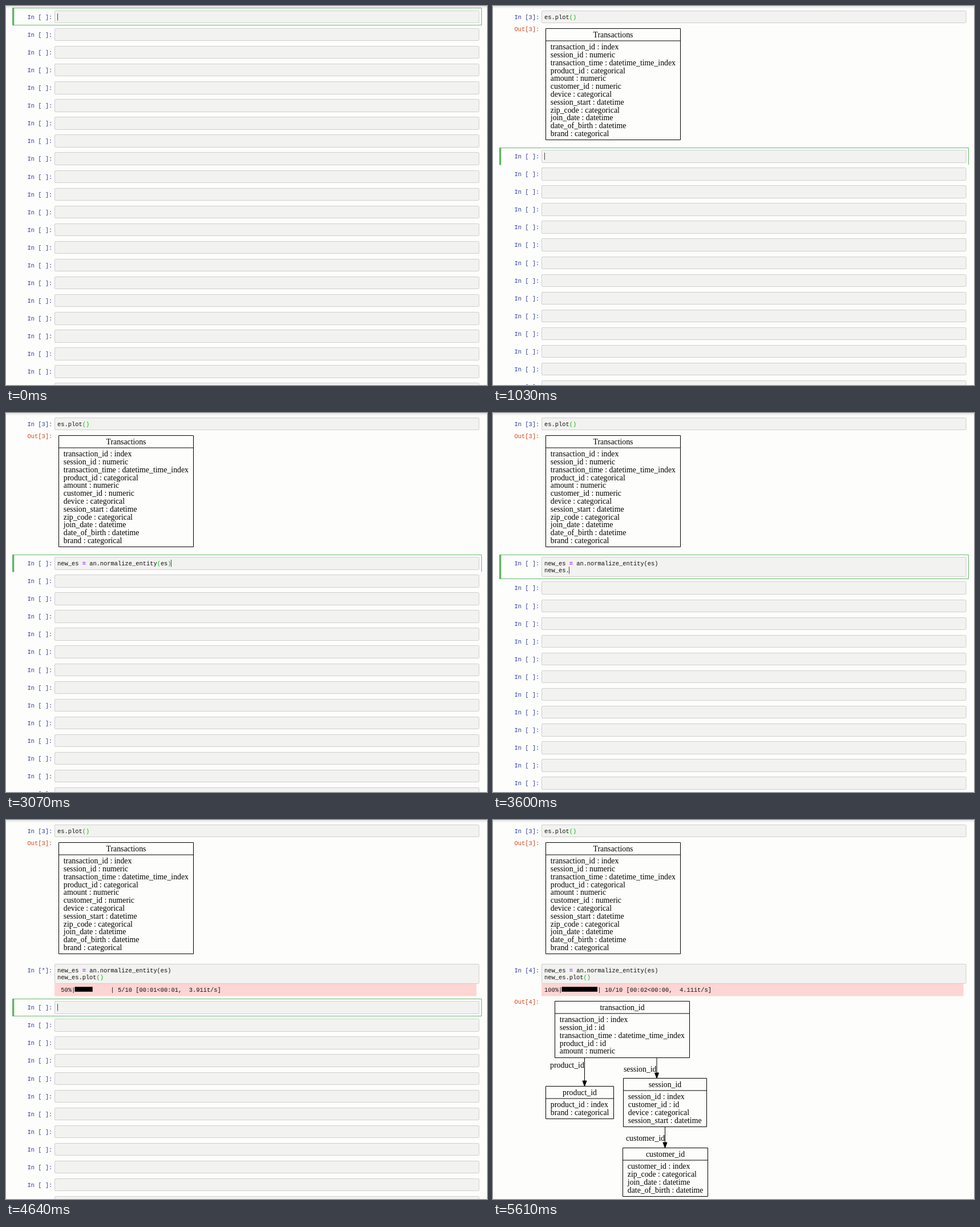
Animation of 843 by 664 pixels, one loop 5650 ms. Source, as an HTML page:

```html
<!DOCTYPE html>
<html lang="en">
<head>
<meta charset="utf-8">
<title>Notebook session</title>
<style>
  html, body { margin: 0; width: 100%; height: 100%; overflow: hidden; background: #fdfdfc; }
  svg { display: block; }
  text { white-space: pre; font: 10.4px "Liberation Mono", Courier, monospace; fill: #111; }
  .in { fill: #303f9f; }
  .out { fill: #d84315; }
  .op { fill: #a2f; font-weight: bold; }
  .match { fill: #0b0; }
  .box { fill: #f2f2f0; stroke: #cfcfcf; }
  .sel { fill: none; stroke: #66bb6a; }
  .bar { fill: #5bb562; }
  .log { fill: #fdd5d4; }
  .caret { fill: #444; }
  .graph text { font: 13.8px "Liberation Serif", Times, serif; fill: #000; }
  .graph path { fill: none; stroke: #000; }
  .graph .tip { fill: #000; }
  .graph .title { text-anchor: middle; }
</style>
</head>
<body>
<svg width="843" height="664" viewBox="0 0 843 664">
  <defs>
    <linearGradient id="shade" x2="0" y2="1">
      <stop stop-color="#e4e4e4"/><stop offset="1" stop-color="#fdfdfc"/>
    </linearGradient>
  </defs>
  <rect width="843" height="5" fill="url(#shade)"/>
  <g id="page"></g>
</svg>
<script>
const LOOP = 5650, CHAR = 6.24, PITCH = 31.08, LINE = 12.3;
const KEY = 57, BLINK = 180, ITERATION = 81;
const RUN1 = 1020, ENTER = 3110, RUN2 = 4160, DONE = 5090;
const first = { text: "es.plot()", start: 140 };
const second = { text: "new_es = an.normalize_entity(es)", start: 1270 };
const third = { text: "new_es.plot()", start: 3220 };
const page = document.getElementById("page");

const text = (x, y, s, cls = "") => `<text x="${x}" y="${y}" class="${cls}">${s}</text>`;
const rect = (x, y, w, h, cls = "", r = 0) =>
  `<rect x="${x}" y="${y}" width="${w}" height="${h}" rx="${r}" class="${cls}"/>`;

const typed = (k, t) => k.text.slice(0, Math.max(0, Math.floor((t - k.start) / KEY) + 1));
const lastKey = (k, t, focus) =>
  t < k.start ? focus : k.start + KEY * (typed(k, t).length - 1);
const closed = s => s.includes("(") && !s.includes(")") ? s + ")" : s;

function code(y, s, match) {
  s = s.replace("=", '<tspan class="op">@</tspan>').replace("@", "=");
  if (match) s = s.replace(/[()]/g, '<tspan class="match">$&</tspan>');
  return text(90, y, s);
}

function cell(top, count = " ", lines = [], matchLine = -1) {
  const y = Math.round(top), extra = lines.length > 1 ? LINE : 0;
  return rect(85.5, y + .5, 743.5, Math.round(top + 21.4 + extra) - y, "box", 1.5) +
    text(37.5, y + 14.5, `In [${count}]:`, "in") +
    lines.map((s, i) => code(y + 14.5 + i * LINE, s, i === matchLine)).join("");
}

function selection(top, height, open) {
  const y = Math.round(top - 4.4) + .5;
  return `<path class="sel" d="M11.5 ${y + height}V${y}H833.5V${y + height}${open ? "" : "Z"}"/>` +
    rect(11, y - .5, 3.3, height + 1, "bar");
}

function caret(top, col, row, age) {
  return age % (2 * BLINK) < BLINK
    ? rect(Math.floor(90 + col * CHAR), Math.round(top) + 5 + row * LINE, 1, 12.5, "caret") : "";
}

function blanks(top) {
  let s = "";
  for (; top < 664; top += PITCH) s += cell(top);
  return s;
}

function table(x, y, w, title, rows) {
  const h = Math.round(29.5 + 13.8 * rows.length);
  return `<path d="M${x} ${y}h${w}v${h}h${-w}zM${x} ${y + 21.5}h${w}"/>` +
    text(x + w / 2, y + 15, title, "title") +
    rows.map((r, i) => text(x + 8.3, y + 36.6 + 13.82 * i, r.replace(":", " : "))).join("");
}

function edge(x, y, end, label, lx, ly) {
  return `<path d="M${x} ${y}V${end - 9}"/><path class="tip" d="M${x - 3.5} ${end - 9.5}h7l-3.5 9.5z"/>` +
    text(lx, ly, label);
}

const graph = s => `<g class="graph">${s}</g>`;

const before = graph(table(92.5, 39.5, 236, "Transactions", [
  "transaction_id:index", "session_id:numeric", "transaction_time:datetime_time_index",
  "product_id:categorical", "amount:numeric", "customer_id:numeric", "device:categorical",
  "session_start:datetime", "zip_code:categorical", "join_date:datetime",
  "date_of_birth:datetime", "brand:categorical"]));

const after = graph(
  table(108.5, 317.5, 236, "transaction_id", ["transaction_id:index", "session_id:id",
    "transaction_time:datetime_time_index", "product_id:id", "amount:numeric"]) +
  table(92.5, 466.5, 119, "product_id", ["product_id:index", "brand:categorical"]) +
  table(228.5, 452.5, 146, "session_id", ["session_id:index", "customer_id:id",
    "device:categorical", "session_start:datetime"]) +
  table(227.5, 574.5, 149, "customer_id", ["customer_id:index", "zip_code:categorical",
    "join_date:datetime", "date_of_birth:datetime"]) +
  edge(160.5, 416.5, 466.5, "product_id", 100, 434) +
  edge(287, 416.5, 452.5, "session_id", 229, 440.8) +
  edge(301.5, 537.5, 574.5, "customer_id", 233, 562.3));

function progress(t) {
  const n = Math.min(10, Math.floor((t - RUN2) / ITERATION));
  const rate = 3.71 + .04 * n;
  const clock = steps => "00:0" + Math.floor(steps / rate);
  const stats = n ? `${clock(n)}&lt;${clock(10 - n)},  ${rate.toFixed(2)}it/s` : "00:00&lt;?, ?it/s";
  return rect(85, 287, 739.5, 21.5, "log") +
    text(90, 300.8, `${String(n * 10).padStart(3)}%|${" ".repeat(10)}| ${n}/10 [${stats}]`) +
    rect(120.5, 292.3, n * 6.25, 8.5);
}

function draw(t) {
  if (t < RUN1) {
    const top = 7.8, s = typed(first, t);
    return selection(top, 30) + cell(top, " ", [closed(s)], 0) +
      caret(top, s.length, 0, t - lastKey(first, t, 0)) + blanks(top + PITCH);
  }
  const top = 252.1;
  const head = cell(7.8, 3, [first.text], 0) + text(37.5, 44.3, "Out[3]:", "out") + before;

  if (t < ENTER) {
    const s = typed(second, t);
    return head + selection(top, 29.5, true) + cell(top, " ", [closed(s)], 0) +
      caret(top, s.length, 0, t - lastKey(second, t, RUN1)) + blanks(top + PITCH);
  }
  if (t < RUN2) {
    const s = typed(third, t);
    return head + selection(top, 42) + cell(top, " ", [second.text, closed(s)], 1) +
      caret(top, s.length, 1, t - lastKey(third, t, ENTER)) + blanks(top + PITCH + LINE);
  }
  const done = t >= DONE, next = 317.2;
  const ran = head + cell(top, done ? 4 : "*", [second.text, third.text], 1) + progress(t);
  if (done) return ran + text(37.5, 322.3, "Out[4]:", "out") + after;
  return ran + selection(next, 30) + cell(next) + caret(next, 0, 0, t - RUN2) + blanks(next + PITCH);
}

let shown = "";
const origin = performance.now();
function tick() {
  const markup = draw((performance.now() - origin) % LOOP);
  if (markup !== shown) page.innerHTML = shown = markup;
  requestAnimationFrame(tick);
}
tick();
</script>
</body>
</html>
```
